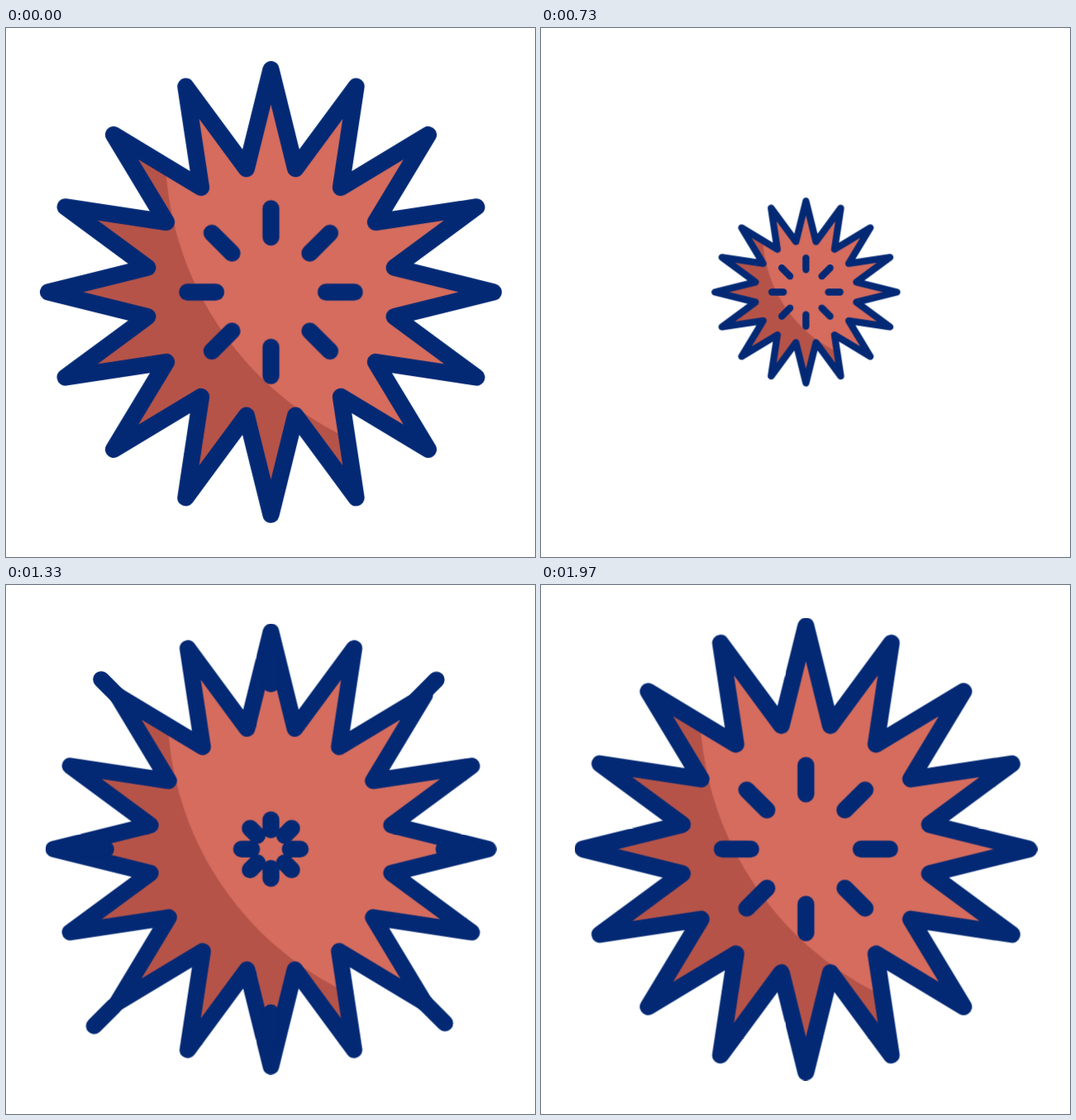
Write an HTML page that moves like this. It is 640 px wide and 640 px high and loops after 2.17 s.

```html
<!DOCTYPE html>
<html lang="en">
<head>
<meta charset="utf-8">
<title>Spiky burst</title>
<style>
  html, body { margin: 0; width: 100%; height: 100%; overflow: hidden; background: #fff; }
  svg { display: block; width: 100vw; height: 100vh; }

  .line { fill: none; stroke: #032975; stroke-width: 20.4; stroke-linecap: round; stroke-linejoin: round; }
  .body { fill: #d56c5e; }
  .shade { fill: #b55349; }

  .pulse, .fly, .grow { transform-origin: 0 0; animation: 2170ms linear infinite; }
  .pulse { animation-name: pulse; }
  .fly { animation-name: fly; }
  .grow { animation-name: grow; }
  .grow line { vector-effect: non-scaling-stroke; }

  @keyframes pulse {
    0% { transform: scale(1); animation-timing-function: cubic-bezier(.22, .57, .36, 1); }
    33.79% { transform: scale(.408); animation-timing-function: cubic-bezier(.035, 1, .2, .945); }
    90.63%, 100% { transform: scale(1); }
  }
  @keyframes fly {
    0%, 33.79% { transform: translate(0px, 0px); visibility: visible; }
    90.63% { transform: translate(var(--x), var(--y)); visibility: visible; }
    90.64%, 100% { transform: translate(var(--x), var(--y)); visibility: hidden; }
  }
  @keyframes grow {
    0%, 56.83% { transform: scale(.01); visibility: hidden; }
    56.84% { transform: scale(.01); visibility: visible; animation-timing-function: cubic-bezier(.22, .61, .36, 1); }
    90.63%, 100% { transform: scale(1); visibility: visible; }
  }
</style>
</head>
<body>
<svg viewBox="0 0 640 640">
  <defs>
    <path id="star"/>
    <clipPath id="inside"><use href="#star"/></clipPath>
  </defs>
  <g transform="translate(320.5 319.5)">
    <g class="pulse">
      <use href="#star" class="body"/>
      <g clip-path="url(#inside)">
        <path class="shade" d="M-127-200V-141A390 390 0 0 0 84 173L110 188V300H-300V-200Z"/>
      </g>
      <use href="#star" class="line"/>
      <g id="flying" class="line"></g>
      <g id="growing" class="line grow"></g>
    </g>
  </g>
</svg>
<script>
  const byId = id => document.getElementById(id);

  // Clockwise from the top, angle in degrees.
  const polar = (radius, angle) => {
    const a = angle * Math.PI / 180;
    return [radius * Math.sin(a), -radius * Math.cos(a)];
  };

  const points = Array.from({ length: 32 }, (_, i) =>
    polar(i % 2 ? 152.5 : 269.8, i * 11.25).map(v => v.toFixed(2)).join(' '));
  byId('star').setAttribute('d', `M${points.join('L')}Z`);

  function addTick(parent, angle) {
    const line = document.createElementNS('http://www.w3.org/2000/svg', 'line');
    const [x1, y1] = polar(66.7, angle);
    const [x2, y2] = polar(101.3, angle);
    Object.entries({ x1, y1, x2, y2 }).forEach(([k, v]) => line.setAttribute(k, v));
    parent.append(line);
    return line;
  }

  // How far each tick travels, clockwise from the top.
  const travel = [
    [0, -285], [276, -286], [305, 0], [298, 298],
    [0, 281], [-305, 305], [-285, 0], [-287, -287]
  ];
  travel.forEach(([x, y], i) => {
    const tick = addTick(byId('flying'), i * 45);
    tick.classList.add('fly');
    tick.style.setProperty('--x', x + 'px');
    tick.style.setProperty('--y', y + 'px');
    addTick(byId('growing'), i * 45);
  });
</script>
</body>
</html>
```
